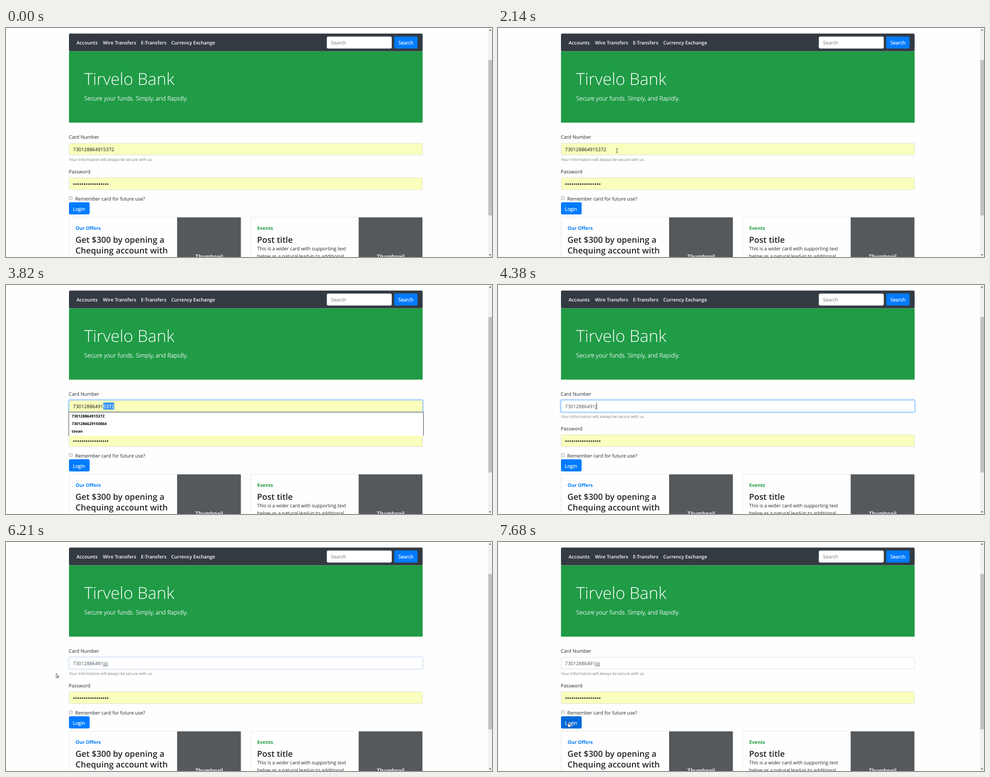
An HTML page for the animation above (7990 ms loop, 1088x515 px).

```html
<!DOCTYPE html>
<html lang="en">
<head>
<meta charset="utf-8">
<title>Online banking login</title>
<style>
  html, body { margin: 0; width: 100%; height: 100%; overflow: hidden; background: #fefefe; }
  svg { display: block; width: 1088px; height: 515px; }
  text { font: 400 10.75px "Open Sans", "Noto Sans", sans-serif; fill: #212529; text-rendering: geometricPrecision; }
  .nav { font-weight: 600; font-size: 10.7px; }
  .white, .nav { fill: #fff; }
  .white, .lead { stroke: #fff; stroke-width: .25; }
  .title { font-weight: 300; font-size: 37.1px; fill: #fff; }
  .lead { font-weight: 300; font-size: 13.3px; fill: #fff; }
  .help { font-size: 8.65px; fill: #737b82; }
  .hint { fill: #6c757d; }
  .tag { font-weight: 700; font-size: 10.7px; }
  .head { font-weight: 600; font-size: 18.7px; }
  .thumb { font: 700 12.3px "Liberation Sans", Arial, sans-serif; fill: #eceeef; }
  .option { font-weight: 700; font-size: 8.6px; fill: #000; }
  .field { stroke: #ced4da; stroke-width: .8; fill: #fff; }
  .auto { fill: #faffbd; }
  .card { fill: #fefefe; stroke: #dfdfdf; stroke-width: .8; }
  .outline { fill: #fff; stroke: #111; stroke-width: .8; stroke-linejoin: round; }
</style>
</head>
<body>
<svg viewBox="0 0 1088 515">
  <defs><clipPath id="selClip"><rect id="clipBox" y="264" width="0" height="17"/></clipPath></defs>

  <rect x="141" y="12.4" width="791.7" height="40.1" rx="3" fill="#343a42"/>
  <text class="nav" x="158" y="37">Accounts</text>
  <text class="nav" x="217" y="37">Wire Transfers</text>
  <text class="nav" x="302" y="37">E-Transfers</text>
  <text class="nav" x="370" y="37">Currency Exchange</text>
  <rect class="field" x="718.4" y="19.4" width="145" height="26.6" rx="3"/>
  <text class="hint" x="727.5" y="37">Search</text>
  <rect x="869" y="19" width="52.4" height="27.2" rx="3" fill="#007bff"/>
  <text class="white" x="878.3" y="37">Search</text>

  <rect x="141" y="52.5" width="791.7" height="160.3" fill="#209b46"/>
  <text class="title" x="175" y="128">Tirvelo Bank</text>
  <text class="lead" x="175" y="162.5">Secure your funds. Simply, and Rapidly.</text>

  <text x="140.6" y="249">Card Number</text>
  <text class="help" x="141" y="298.5">Your information will always be secure with us.</text>
  <rect id="ring" x="138.2" y="256.2" width="797.4" height="32" rx="5" fill="#bfdeff"/>
  <rect id="number" class="field" x="141.4" y="259.2" width="791.2" height="26.3" rx="3"/>
  <text id="value" x="150" y="276.7"></text>
  <rect id="sel" y="264.5" width="0" height="15.5" fill="#308ff0"/>
  <text id="picked" class="white" x="150" y="276.7" clip-path="url(#selClip)"></text>
  <rect id="caret" y="264.5" width=".9" height="15.5" fill="#111"/>

  <text x="140.6" y="327">Password</text>
  <rect class="field auto" x="141.4" y="336.6" width="791.2" height="26.7" rx="3"/>
  <path d="M152.2 351H228" stroke="#111" stroke-width="3.2" stroke-linecap="round" stroke-dasharray="0 4.72"/>
  <rect x="141.4" y="378.9" width="7.2" height="7.4" rx="1" fill="#ececec" stroke="#a3a3a3" stroke-width=".8"/>
  <text x="155" y="388.3">Remember card for future use?</text>

  <g id="list">
    <rect x="140.5" y="286" width="794" height="52.7" fill="#fff"/>
    <path d="M140.6 338.7V285.9H934.5V338.7" fill="none" stroke="#222" stroke-width=".9"/>
    <text class="option" x="147" y="297.6">730128864915372</text>
    <text class="option" x="147" y="314.7">7301286629150864</text>
    <text class="option" x="147" y="331.8">tovan</text>
  </g>

  <rect x="141" y="392" width="46.2" height="27.2" rx="3" fill="#007bff"/>
  <rect id="hover" x="141" y="392" width="46.2" height="27.2" rx="3" fill="#0069d9"/>
  <text class="white" x="149.8" y="410.5">Login</text>

  <rect class="card" x="141.2" y="425.4" width="384.8" height="120" rx="3"/>
  <rect x="383" y="426" width="142.7" height="100" fill="#55595c"/>
  <text class="tag" x="155.7" y="453.6" style="fill:#007bff">Our Offers</text>
  <text class="head" x="155.5" y="482.6">Get $300 by opening a</text>
  <text class="head" x="155.5" y="506.8">Chequing account with</text>
  <text class="thumb" x="454.8" y="518" text-anchor="middle">Thumbnail</text>

  <rect class="card" x="547.6" y="425.4" width="385" height="120" rx="3"/>
  <rect x="789.5" y="426" width="142.7" height="100" fill="#55595c"/>
  <text class="tag" x="562.5" y="453.6" style="fill:#209b46">Events</text>
  <text class="head" x="562" y="482.6">Post title</text>
  <text x="562.3" y="500.3">This is a wider card with supporting text</text>
  <text x="562.3" y="517.3">below as a natural lead-in to additional</text>
  <text class="thumb" x="861.2" y="518" text-anchor="middle">Thumbnail</text>

  <rect x="1079" width="9" height="515" fill="#f1f1f1"/>
  <rect x="1079.8" y="72" width="8.2" height="349.5" fill="#c1c1c1"/>
  <path d="M1081.3 6h5l-2.5-3zM1081.3 509h5l-2.5 3z" fill="#505050"/>

  <g id="pointer">
    <circle id="halo" r="8" fill="#fadc00" fill-opacity=".65"/>
    <path id="arrow" class="outline" d="M.4.4V9.6L2.5 7.7 3.9 10.7 5.2 10.1 3.9 7.2H6.7Z"/>
    <path id="beam" d="M-2-4.7H-.6L0-4.2.6-4.7H2M-2 4.7H-.6L0 4.2.6 4.7H2M0-4.2V4.2" fill="none" stroke="#333" stroke-width=".9"/>
    <path id="hand" class="outline" d="M-1 .9a1 1 0 0 1 2 0V4.2l3.2.8q1.3.4 1.1 1.8l-.6 3.4q-.2 1.2-1.2 1.2H.6L-2.9 7.4q.2-1.6 1.9-.4Z"/>
  </g>
</svg>
<script>
const LOOP = 7990, STEP = 50, LEFT = 150, DIGIT = 6.15;
const CARD = "730128864915372", KEPT = 11;
const KEYS = [4380, 4580, 4730, 4910];

// Pointer moves: start time, number of steps, target x, target y
const MOVES = [
  [560, 4, 800, 452], [960, 3, 610, 363], [1350, 4, 414, 297], [1690, 4, 277, 276],
  [2090, 4, 255.5, 275], [2580, 7, 233, 274], [2930, 2, 227.5, 274.5], [3230, 6, 218.5, 274.5],
  [5610, 5, 146, 283], [5860, 3, 112, 295.3], [6470, 8, 144, 376],
  [7020, 1, 147, 382], [7070, 5, 157.7, 405.3]
];

const $ = id => document.getElementById(id);
const set = (id, attrs) => { for (const k in attrs) $(id).setAttribute(k, attrs[k]); };
const show = (id, on) => set(id, { visibility: on ? "inherit" : "hidden" });
const within = (t, a, b) => t >= a && t < b;
const ramp = (t, a) => Math.min(1, Math.max(0, (t - a) / 150));
const ease = p => p * p * (3 - 2 * p);

function pointerAt(t) {
  let x = 992, y = 518;
  for (const [start, steps, tx, ty] of MOVES) {
    if (t < start) break;
    const p = ease(Math.min(1, (Math.floor((t - start) / STEP) + 1) / steps));
    x += (tx - x) * p;
    y += (ty - y) * p;
  }
  return [x, y];
}

function drawPointer(t, x, y) {
  const overField = within(x, 141, 933) && (within(y, 259, 286) || within(y, 336, 364));
  const overLogin = within(x, 141, 187) && within(y, 392, 419);
  set("pointer", {
    transform: `translate(${x} ${y})`,
    visibility: within(t, 560, 3820) || t >= 5610 ? "visible" : "hidden"
  });
  show("beam", overField);
  show("hand", overLogin);
  show("arrow", !overField && !overLogin);
  show("halo", within(t, 2290, 3820) || within(t, 6060, 6210) || within(t, 7630, 7680));
}

function drawField(t, x) {
  const typed = KEYS.filter(k => t >= k).length;
  const text = typed ? CARD.slice(0, KEPT) + "j".repeat(typed) : CARD;
  $("value").textContent = $("picked").textContent = text;
  $("value").style.fill = typed ? "#495057" : "#111";
  $("number").style.fill = typed ? "#fff" : "#faffbd";

  const focus = ramp(t, 2290) - ramp(t, 6110);
  set("ring", { opacity: focus });
  $("number").style.stroke = focus > .5 ? "#80bdff" : "#ced4da";
  show("list", within(t, 2390, 4380));

  const end = CARD.length;
  const from = within(t, 2290, 4380) ? Math.min(end, Math.round((x - LEFT) / DIGIT)) : end;
  const box = { x: LEFT + from * DIGIT, width: (end - from) * DIGIT };
  set("sel", box);
  set("clipBox", box);

  const tail = LEFT + KEPT * DIGIT + typed * 2.75;
  set("caret", { x: typed ? tail : LEFT + end * DIGIT - .4 });
  show("caret", within(t, 2290, 4380) && from === end || within(t, 4380, 5460) || within(t, 5990, 6110));
}

let origin;
function frame(now) {
  origin ??= now;
  const t = (now - origin) % LOOP;
  const [x, y] = pointerAt(t);
  drawField(t, x);
  drawPointer(t, x, y);
  set("hover", { opacity: ramp(t, 7120), fill: within(t, 7630, 7680) ? "#0062cc" : "#0069d9" });
  requestAnimationFrame(frame);
}
requestAnimationFrame(frame);
</script>
</body>
</html>
```
